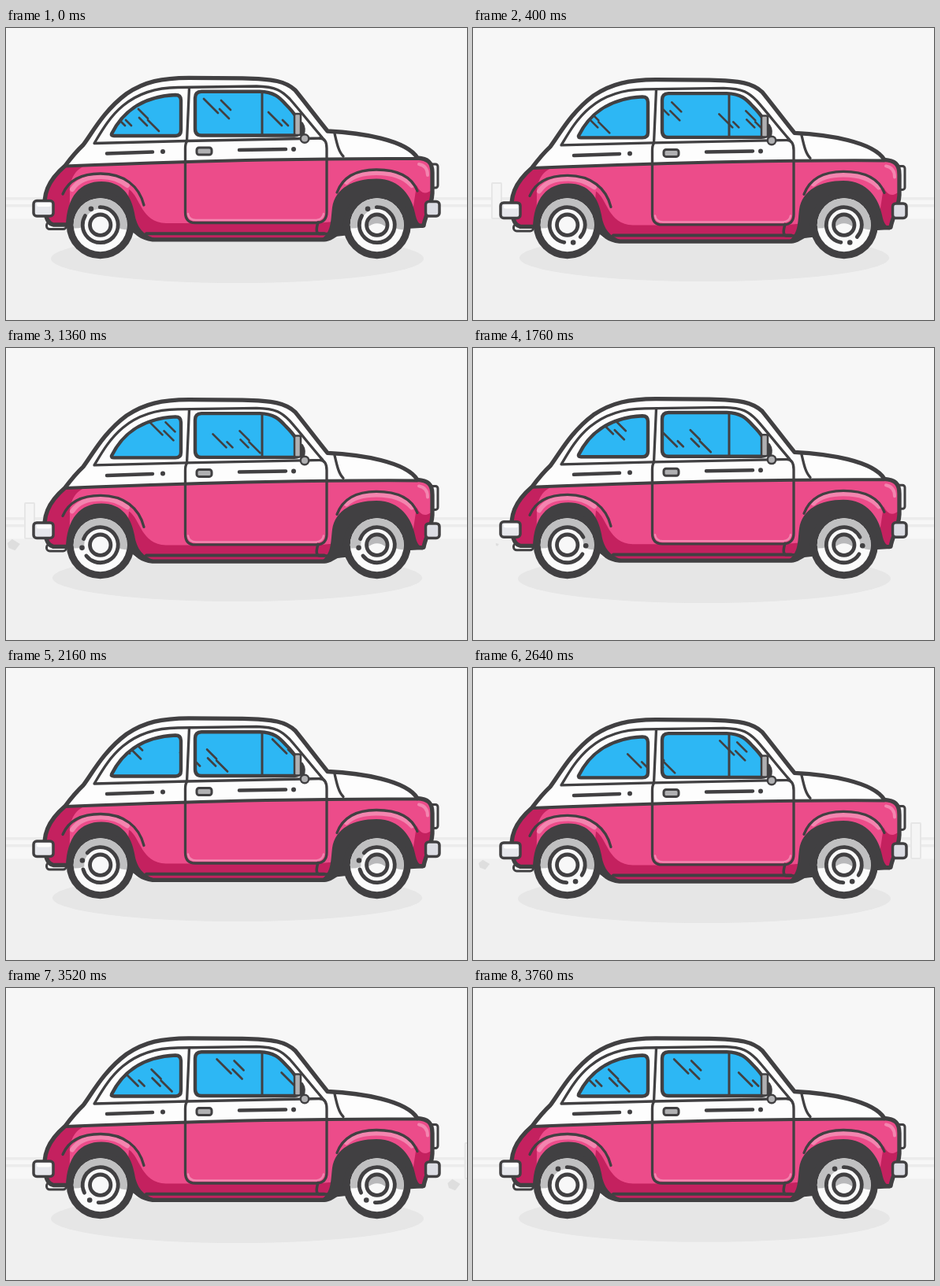
An HTML page with a canvas that plays this animation: 585x371 px, repeating every 3840 ms.

```html
<!DOCTYPE html>
<html lang="en">
<head>
<meta charset="utf-8">
<title>Little car</title>
<style>
html, body { margin: 0; width: 100%; height: 100%; overflow: hidden; background: #f7f7f7; }
canvas { display: block; width: 585px; height: 371px; }
</style>
</head>
<body>
<canvas id="stage" width="585" height="371"></canvas>
<script>
const ctx = document.getElementById('stage').getContext('2d');
const STEP = 80, STEPS = 48;
const INK = '#414042', PINK = '#ec4c8a', DEEP = '#c4215f', PALE = '#f385af';
const WHITE = '#fdfdfd', SKY = '#2db7f4', GREY = '#b0b0b2', CHROME = '#e6e7ec';
const SCENERY_SPEED = 26.6, GLINT_SPEED = 199 / STEPS;
const BOUNCE = [0.5, 2.4, 1.3, 0.5];

const path = d => new Path2D(d);
const shell = path(`M50 235 C46 212 53 194 75 175 C84 163 90 156 98 148.5
  C109 134 124 105 153 83.5 C176 68 198 63.5 232 63.3 L300 63.8 C340 64.5 355 68 367 79
  C380 95 395 115 408 131 C450 133 508 142 522 165 C535 166 541 170 541 184
  L541 210 C540 228 532 238 530 251 L513 252 L420 262 C412 266 410 268.8 404 268.8
  L186 268.8 C172 267 165 262 160 250 L60 250 Q52 248 50 235 Z`);
const upper = path('M75 175.5 Q300 166 522 166 L560 50 H40 Z');
const belt = path('M75 175.5 Q230 169.5 330 167.5 T522 166');
const rearShade = path('M40 170 L104 174 C88 178 80 192 81 212 L80 260 H40 Z');
const sillShade = path('M156 205 C171 215 171 247 203 248 L394 248 L416 246 V275 H150 Z');
const noseShade = path('M521 200 Q529 216 541 205 V260 H512 Z');
const rearArch = path(`M76 252 C77 213 95 195 121 195 C147 195 159 213 163 235
  C166 254 174 262 188 267 V270.5 Q172 269 160 259 L120 250 Z`);
const frontArch = path(`M400 268 C413 260 412 245 414 228 C418 203 441 191.5 470 191.5
  C501 191.5 515 215 519 235 C521 246 525 251 531 251 L529 254 L470 250 L428 263
  Q416 264 411 268 Z`);
const rearWindow = path(`M134 134.5 C146 110 170 87 215 85 Q222 85 222 92
  V130 Q222 137 215 137 H137 Q133 137 134 134.5 Z`);
const sideWindow = path(`M248 80.7 H322 C340 81 347 88 355 97 C367 109 372 117 373 129
  Q373 136.5 366 136.5 H248 Q240 136.5 240 128 V89 Q240 80.7 248 80.7 Z`);
const cabin = path(`M112 146.5 C128 120 150 76 218 75.5 L318 74 C343 74.5 350 80 360 90
  C375 107 388 124 402 140 L229 143.5 Z`);
const door = path(`M232.5 76 L229.5 144 Q227.5 147 227.5 153 V234 Q227.5 247.5 240 247.5
  H394 Q407 247 407 234 V153 Q407 140 398 140`);
const rearFender = path('M72 211 C80 192 98 185 120 185 C150 185 169 201 175 225');
const frontFender = path('M420 209 C427 190 443 180 470 180 C497 180 515 189 522 207');
const rearGloss = path('M84 205 C92 193 104 189 121 189 C136 189 146 194 154 200');
const frontGloss = path('M432 196 C441 187 454 184 470 184 C490 184 506 190 515 200');

// Each streak: start x, start y, length along the diagonal.
const glints = [
  { x: 251, y: 90, streaks: [[0, 0, 18], [22, 2, 12], [20, 13, 12]] },
  { x: 333, y: 107, streaks: [[0, 0, 17], [18, 10, 7], [34, -4, 12], [35, 7, 10], [46, 10, 14]] }
];
const rocks = [[301, 8], [328, 2], [462, 8], [616, 2], [892, 7], [1087, 4]];

const wrap = (v, n) => ((v % n) + n) % n;

function fill(shape, color) {
  ctx.fillStyle = color;
  ctx.fill(shape);
}

function stroke(shape, width = 3.3, color = INK) {
  ctx.lineWidth = width;
  ctx.strokeStyle = color;
  ctx.stroke(shape);
}

function line(x1, y1, x2, y2, width, color) {
  const p = new Path2D();
  p.moveTo(x1, y1);
  p.lineTo(x2, y2);
  stroke(p, width, color);
}

function circle(x, y, r) {
  const p = new Path2D();
  p.arc(x, y, r, 0, Math.PI * 2);
  return p;
}

function box(x, y, w, h, r, color, width = 3, edge = INK) {
  const p = new Path2D();
  p.roundRect(x, y, w, h, r);
  fill(p, color);
  if (width) stroke(p, width, edge);
}

const disc = (x, y, r, color) => fill(circle(x, y, r), color);

function clipped(shape, draw) {
  ctx.save();
  ctx.clip(shape);
  draw();
  ctx.restore();
}

function drawScenery(n) {
  ctx.fillStyle = '#f7f7f7';
  ctx.fillRect(0, 0, 585, 371);
  ctx.fillStyle = '#f0f0f0';
  ctx.fillRect(0, 242.5, 585, 129);
  ctx.fillStyle = '#ececec';
  ctx.fillRect(0, 215, 585, 3.5);
  ctx.fillRect(0, 224, 585, 3.5);

  const gap = SCENERY_SPEED * 12;
  const first = wrap(30 + (17 - n) * SCENERY_SPEED, gap);
  for (let x = first; x < 600; x += gap) {
    box(x - 6, 197, 12, 45, 1, '#f5f5f5', 2, '#e6e6e6');
  }

  const loop = SCENERY_SPEED * STEPS;
  for (const [start, r] of rocks) {
    const x = wrap(start - n * SCENERY_SPEED + 20, loop) - 20;
    const p = new Path2D();
    p.moveTo(x - r, 248);
    p.lineTo(x - r / 4, 250 - r * 0.9);
    p.lineTo(x + r, 249);
    p.lineTo(x + r / 5, 250 + r * 0.9);
    p.lineTo(x - r * 0.8, 250 + r * 0.5);
    fill(p, '#dedede');
  }
}

function drawShadow(n) {
  const shrink = 1 - Math.cos(n * Math.PI * 2 / 11);
  const p = new Path2D();
  p.ellipse(293.5, 293 - shrink / 2, 236.5 - shrink, 31 - shrink / 2, 0, 0, Math.PI * 2);
  fill(p, '#e6e6e6');
}

function drawGlints(n) {
  const span = GLINT_SPEED * STEPS;
  for (const { x, y, streaks } of glints) {
    for (let left = wrap(x - n * GLINT_SPEED, span); left < 400; left += span) {
      for (const [dx, dy, len] of streaks) {
        line(left + dx, y + dy, left + dx + len, y + dy + len, 2.7);
      }
    }
  }
}

function drawWindow(shape, n) {
  fill(shape, SKY);
  clipped(shape, () => drawGlints(n));
  stroke(shape, 4.4);
}

function drawBody(n) {
  box(51.5, 247, 25, 8.5, 4, WHITE);
  box(538, 173, 10, 30, 3, '#f0f0f2');

  fill(shell, PINK);
  clipped(shell, () => {
    fill(rearShade, DEEP);
    fill(sillShade, DEEP);
    fill(noseShade, DEEP);
    fill(upper, WHITE);
    stroke(path('M524 173 Q535 175 535 187'), 4, PALE);
  });
  stroke(rearGloss, 6, PALE);
  stroke(frontGloss, 6, PALE);
  stroke(path('M231 236 Q232 244 241 244 H394 Q402 243 403 236'), 2.5, PALE);

  stroke(belt, 4);
  stroke(cabin);
  stroke(door);
  stroke(rearFender);
  stroke(frontFender);
  stroke(path('M417 134 C420 147 422 157 428 163'));
  stroke(path('M178 261.2 H404'), 4);
  stroke(path('M396 247 Q392 260 397 261.5 H414'), 3.5);
  stroke(shell, 5.3);
  fill(rearArch, INK);
  fill(frontArch, INK);

  drawWindow(rearWindow, n);
  drawWindow(sideWindow, n);
  line(325, 82, 325, 136, 3);

  line(128, 159.5, 186, 157.5, 4.5);
  disc(199, 157, 3, INK);
  line(296, 155, 355, 154, 4.5);
  disc(365, 154, 3, INK);
  box(242, 152, 19, 9, 3, GREY);

  stroke(path('M375 122 Q379 128 376 136'), 5);
  box(366, 109, 8, 27, 2, GREY, 2.5);
  disc(379, 140.5, 6.5, INK);
  disc(379, 140.5, 4, GREY);

  box(35, 219.5, 25, 19.5, 4, CHROME, 3.5);
  box(39, 222, 18, 5, 2, WHITE, 0);
  box(532.5, 220.5, 17.5, 18.5, 4, '#dcdde4', 3.5);
}

function drawWheel(x, y, angle, shadedHub) {
  ctx.save();
  ctx.translate(x, y);
  disc(0, 0, 43, INK);
  const face = circle(0, 0, 34);
  fill(face, '#fbfbfb');
  clipped(face, () => fill(path(
    'M-40 -40 H40 V6 H32 Q22 5 14 -2 Q0 -9 -14 -2 Q-22 6 -40 4 Z'), '#c0c0c1'));

  stroke(circle(0, 0, 17.5), 6, '#f8f8f8');
  const hub = circle(0, 0, 11);
  fill(hub, '#f8f8f8');
  if (shadedHub) clipped(hub, () => fill(path('M-12 -14 H12 V3 Q0 -7 -12 3 Z'), '#b9b9bb'));

  stroke(circle(0, 0, 13.2), 4.8);
  const rim = new Path2D();
  rim.arc(0, 0, 22.5, angle + 0.5, angle + Math.PI * 2 - 0.5);
  stroke(rim, 4.8);
  disc(23.5 * Math.cos(angle), 23.5 * Math.sin(angle), 3.3, INK);
  ctx.restore();
}

function draw(now) {
  const n = Math.floor(now / STEP) % STEPS;
  const lift = n ? BOUNCE[n % 4] : 0;
  const angle = Math.PI * (-2 / 3 + n * 10 / (STEPS - 1));

  ctx.lineCap = ctx.lineJoin = 'round';
  drawScenery(n);
  drawShadow(n);
  ctx.save();
  ctx.translate(0, lift);
  drawBody(n);
  ctx.restore();
  drawWheel(119.7, 250.2, angle, false);
  drawWheel(470.8, 250.2, angle, true);
}

const start = performance.now();
function tick() {
  draw(performance.now() - start);
  requestAnimationFrame(tick);
}
tick();
</script>
</body>
</html>
```
